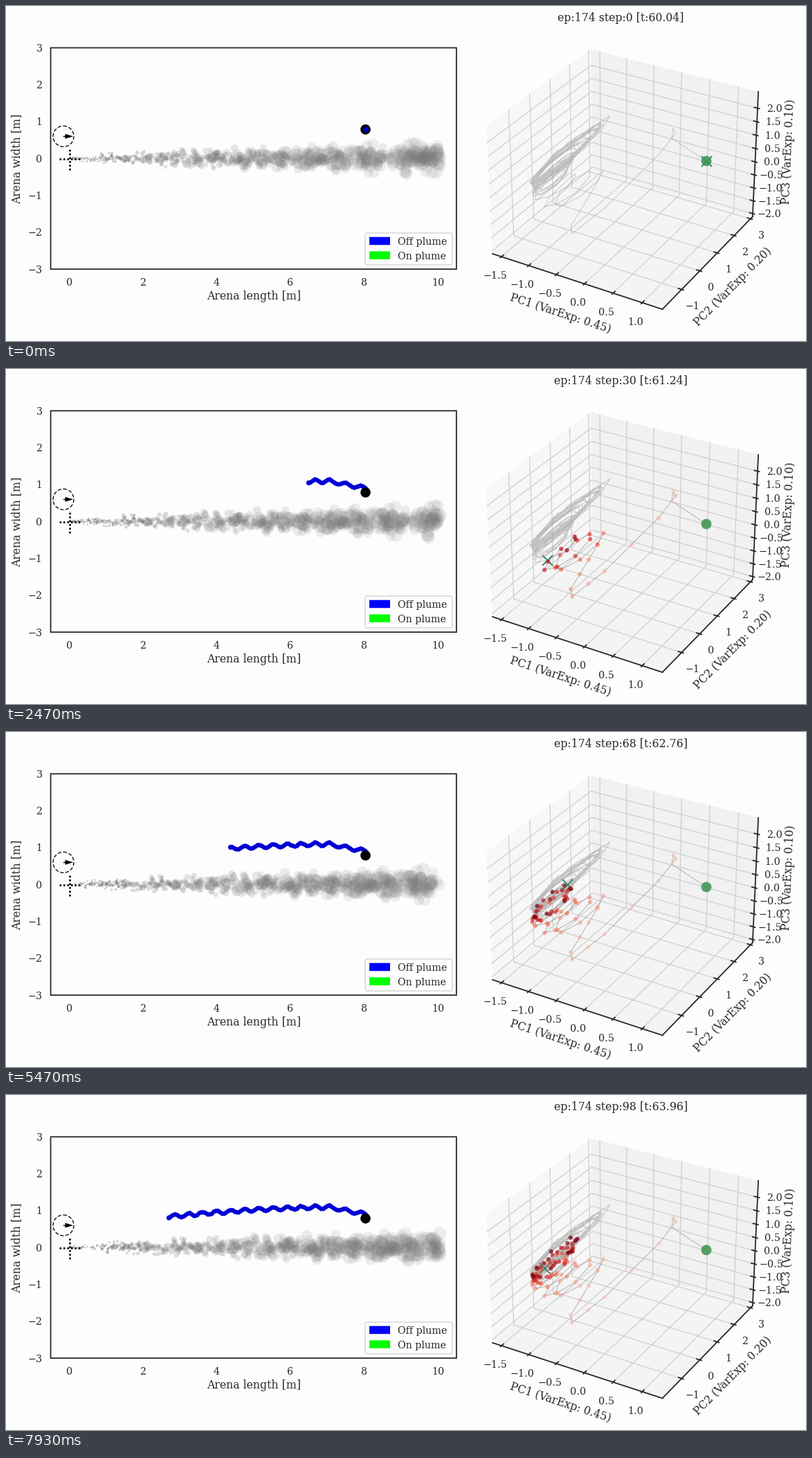
Recreate the animation shown at these times as a matplotlib script. Size 1156 by 484 pixels, loop 8000 ms.

```python
import numpy as np
import matplotlib.pyplot as plt
from matplotlib.animation import FuncAnimation
from matplotlib.patches import Circle, FancyBboxPatch, Polygon, Rectangle

plt.rcParams["font.family"] = "DejaVu Serif"

W, H = 1156, 484
FRAMES, LOOP_MS, STEPS = 120, 8000, 100
PT = 0.72  # points per pixel at 100 dpi
INK, GRID, PAPER = "#262626", "#cfcfcf", "#fdfdfd"
TICK_SIZE, LABEL_SIZE = 14.3 * PT, 15.7 * PT

fig = plt.figure(figsize=(W / 100, H / 100), dpi=100, facecolor=PAPER)
ax = fig.add_axes([0, 0, 1, 1])
ax.set(xlim=(0, W), ylim=(H, 0))
ax.axis("off")
rng = np.random.default_rng(174)


def text(x, y, s, size=TICK_SIZE, ha="center", rotation=0):
    return ax.text(x, y, s, size=size, color=INK, ha=ha, rotation=rotation,
                   va="center" if rotation else "center_baseline", zorder=12)


def line(points, color=INK, width=1.8, **kw):
    xs, ys = np.transpose(points)
    return ax.plot(xs, ys, color=color, lw=width * PT, **kw)[0]


def dots(radius, **kw):
    return ax.scatter([], [], s=(2 * radius * PT) ** 2, linewidths=0, **kw)


def signed(value, digits=0):
    return f"{value:.{digits}f}".replace("-", "\u2212")


# ---------- arena ----------
SCALE, ORIGIN_X, ORIGIN_Y = 53.3, 91.2, 220.3


def arena(x, y):
    return ORIGIN_X + SCALE * x, ORIGIN_Y - SCALE * y


ax.add_patch(Rectangle(arena(-0.5, 3), 11 * SCALE, 6 * SCALE, fill=False,
                       ec=INK, lw=1.8 * PT, snap=False, zorder=8))
for v in range(0, 11, 2):
    text(arena(v, 0)[0], 398.5, str(v))
for v in range(-3, 4):
    text(52.5, arena(0, v)[1], signed(v), ha="right")
text(358, 418, "Arena length [m]", LABEL_SIZE)
text(16, 220.5, "Arena width [m]", LABEL_SIZE, rotation=90)

for ends in ([(76.5, 220.5), (107, 220.5)], [(91.5, 236.5), (91.5, 206)]):
    line(ends, "black", 2.6, ls=(0, (1, 1.1)), zorder=6)
ax.add_patch(Circle((83, 188.3), 15, fill=False, ec="black", lw=1.3 * PT,
                    ls=(0, (4, 2)), zorder=6))
line([(83, 188.3), (90, 188.3)], "black", 1.4, zorder=6)
ax.add_patch(Polygon([(85.5, 184.8), (97, 188.3), (85.5, 191.8)],
                     color="black", lw=0, zorder=6))

ax.add_patch(FancyBboxPatch((522, 331), 120, 40, boxstyle="round,pad=3,rounding_size=3",
                            fc=(1, 1, 1, 0.8), ec=GRID, lw=1.3 * PT, zorder=9))
for y, color, name in ((339.5, "#0000ff", "Off plume"), (360.2, "#00ff00", "On plume")):
    ax.add_patch(Rectangle((525, y - 5.75), 30, 11.5, color=color, lw=0,
                           snap=False, zorder=10))
    text(566, y, name, ha="left")

# ---------- plume ----------
PUFFS, REACH = 780, 10.05
puff_start = rng.uniform(0, REACH, PUFFS)
puff_side = np.clip(rng.normal(0, 1, PUFFS), -2.4, 2.4)
puff_size = rng.uniform(0.8, 1.2, PUFFS)
plume = ax.scatter([], [], linewidths=0, zorder=2)


def draw_plume(step):
    x = (puff_start + 0.02 * step) % REACH
    plume.set_offsets(np.column_stack(arena(x, 0.06 * x ** 0.48 * puff_side)))
    plume.set_sizes((2 * PT * (0.8 + 0.85 * x) * puff_size) ** 2)
    colors = np.full((PUFFS, 4), 0.48)
    colors[:, 3] = 0.12 + 0.4 * np.exp(-x / 2.2)
    plume.set_facecolors(colors)


# ---------- flight path ----------
def flight():
    """Short climb, then a steady upwind zigzag that sinks slowly."""
    t = np.arange(STEPS)
    x = np.minimum(519.5, 526.8 - 2.98 * t)
    early, late = np.maximum(x - 467, 0), np.maximum(467 - x, 0)
    phase = 2 * np.pi * (late / 20.4 - early / 22.8)
    y = 161.5 + 0.2 * early + 14 * (late / 235) ** 1.6 - 2.3 * np.cos(phase)
    return np.column_stack([x, y + 2.8 * np.maximum(2 - t, 0)])


path = flight()
trail = dots(3.3, color="#0000d4", zorder=4)
ax.add_patch(Circle(path[0], 7.3, color="black", lw=0, zorder=5))
fly = dots(3.6, color="#0000d4", zorder=6)

# ---------- 3D box ----------
LIMITS = np.array([(-1.667, 1.34), (-2.026, 3.13), (-2.12, 2.6)])
HALF = np.array([0.595, 0.595, 0.4464])
ELEV, AZIM = np.radians(30), np.radians(-60)
RIGHT = np.array([-np.sin(AZIM), np.cos(AZIM), 0])
UP = np.array([-np.sin(ELEV) * np.cos(AZIM), -np.sin(ELEV) * np.sin(AZIM), np.cos(ELEV)])
TOWARD = np.cross(RIGHT, UP)


def project(p):
    depth = 10 - p @ TOWARD
    return 894.4 + 2363 * (p @ RIGHT) / depth, 241.3 - 2363 * (p @ UP) / depth


def draw_pane(axis, side, shade):
    corners = [np.insert(c, axis, side) * HALF
               for c in ((-1, -1), (1, -1), (1, 1), (-1, 1))]
    ax.add_patch(Polygon([project(c) for c in corners], fc=(shade,) * 3 + (0.5,),
                         ec="none", zorder=1))


def draw_axis(axis, ticks, digits, bends, edge, outward, shift):
    """Axis line along an edge, with ticks, labels and grid lines through bends."""
    def at(signs, value):
        p = HALF * signs
        p[axis] = value
        return p

    line([project(at(edge, s * HALF[axis])) for s in (-1, 1)], zorder=7)
    low, high = LIMITS[axis]
    out = np.array(outward)
    for tick in ticks:
        value = HALF[axis] * (2 * (tick - low) / (high - low) - 1)
        line([project(at(b, value)) for b in bends], GRID, 1.3, zorder=1.5)
        base = at(edge, value)
        line([project(base - 0.022 * out), project(base + 0.012 * out)], zorder=7)
        x, y = project(base)
        text(x + shift[0], y + shift[1], signed(tick, digits))


for axis, side, shade in ((0, -1, 0.95), (1, 1, 0.90), (2, -1, 0.925)):
    draw_pane(axis, side, shade)
draw_axis(0, np.arange(-1.5, 1.1, 0.5), 1, [(0, -1, -1), (0, 1, -1), (0, 1, 1)],
          (0, -1, -1), (0, -1, 0), (-9.5, 26.5))
draw_axis(1, np.arange(-1, 4), 0, [(1, 0, -1), (-1, 0, -1), (-1, 0, 1)],
          (1, 0, -1), (1, 0, 0), (15.8, 22.8))
draw_axis(2, np.arange(-2, 2.1, 0.5), 1, [(-1, -1, 0), (-1, 1, 0), (1, 1, 0)],
          (1, 1, 0), (1, 0, 0), (24, -0.5))

text(801, 444, "PC1 (VarExp: 0.45)", LABEL_SIZE, rotation=-18)
text(1050, 406, "PC2 (VarExp: 0.20)", LABEL_SIZE, rotation=45.4)
text(1131, 210.5, "PC3 (VarExp: 0.10)", LABEL_SIZE, rotation=87.5)


# ---------- neural trajectory ----------
def neural(total=190):
    """A swoop through key points, then noisy tilted loops that drift and grow."""
    keys = np.array([(0, 1012, 224), (1, 962, 191), (2, 964, 177), (3, 968, 183),
                     (4, 943, 215), (6, 865, 292), (8, 818, 329), (9, 816, 318),
                     (12, 855, 254)]).T
    t = np.arange(13)
    swoop = np.column_stack([np.interp(t, keys[0], k) for k in keys[1:]])

    t = np.arange(13, total)
    knots = [13, 27, 32, 99, total]
    cx = np.interp(t, knots, [832, 800, 786, 794, 816])
    cy = np.interp(t, knots, [263, 267, 256, 231, 206])
    reach = np.interp(t, knots, [44, 38, 32, 45, 77]) * rng.uniform(0.86, 1.04, len(t))
    turns = np.interp(t, [13, 27.7, total], [-8, -6, (total - 68.5) / 6.8])
    along = reach * np.cos(2 * np.pi * turns)
    across = rng.uniform(4, 12, len(t)) * np.sin(2 * np.pi * turns)
    loops = np.column_stack([cx + 0.77 * along + 0.64 * across,
                             cy - 0.64 * along + 0.77 * across])
    return np.vstack([swoop, loops])


states = neural()
line(states, "#a0a0a0", 0.9, alpha=0.6, zorder=2)
history = line(states[:1], "#888888", 1, alpha=0.25, zorder=2.5)
ax.add_patch(Circle(states[0], 7.4, fc="#3f9550", alpha=0.88, lw=0, zorder=4))
cross, = ax.plot([], [], "x", color="#2e8468", ms=15 * PT, mew=1.9 * PT, zorder=3)
visited = dots(3.1, zorder=5)
title = text(888.5, 16, "", LABEL_SIZE)


def update(frame):
    step = max(0, (10 * frame - 1) // 12)
    title.set_text(f"ep:174 step:{step} [t:{60.04 + 0.04 * step:.2f}]")
    draw_plume(step)
    trail.set_offsets(path[:step + 1])
    fly.set_offsets(path[step:step + 1])
    history.set_data(*states[:step + 1].T)
    cross.set_data(*states[step:step + 1].T)
    past = states[1:max(step, 1)]
    visited.set_offsets(past)
    recency = np.arange(1, len(past) + 1) / max(step, 1)
    darkest = min(1, 0.72 + step / 160)
    colors = plt.cm.Reds(0.2 + (darkest - 0.2) * recency)
    colors[:, 3] = 0.4 + 0.35 * recency
    visited.set_facecolors(colors)
    return plume, trail, fly, history, cross, visited, title


anim = FuncAnimation(fig, update, frames=FRAMES, interval=LOOP_MS / FRAMES,
                     repeat=True, repeat_delay=0, blit=False)
plt.show()
```
